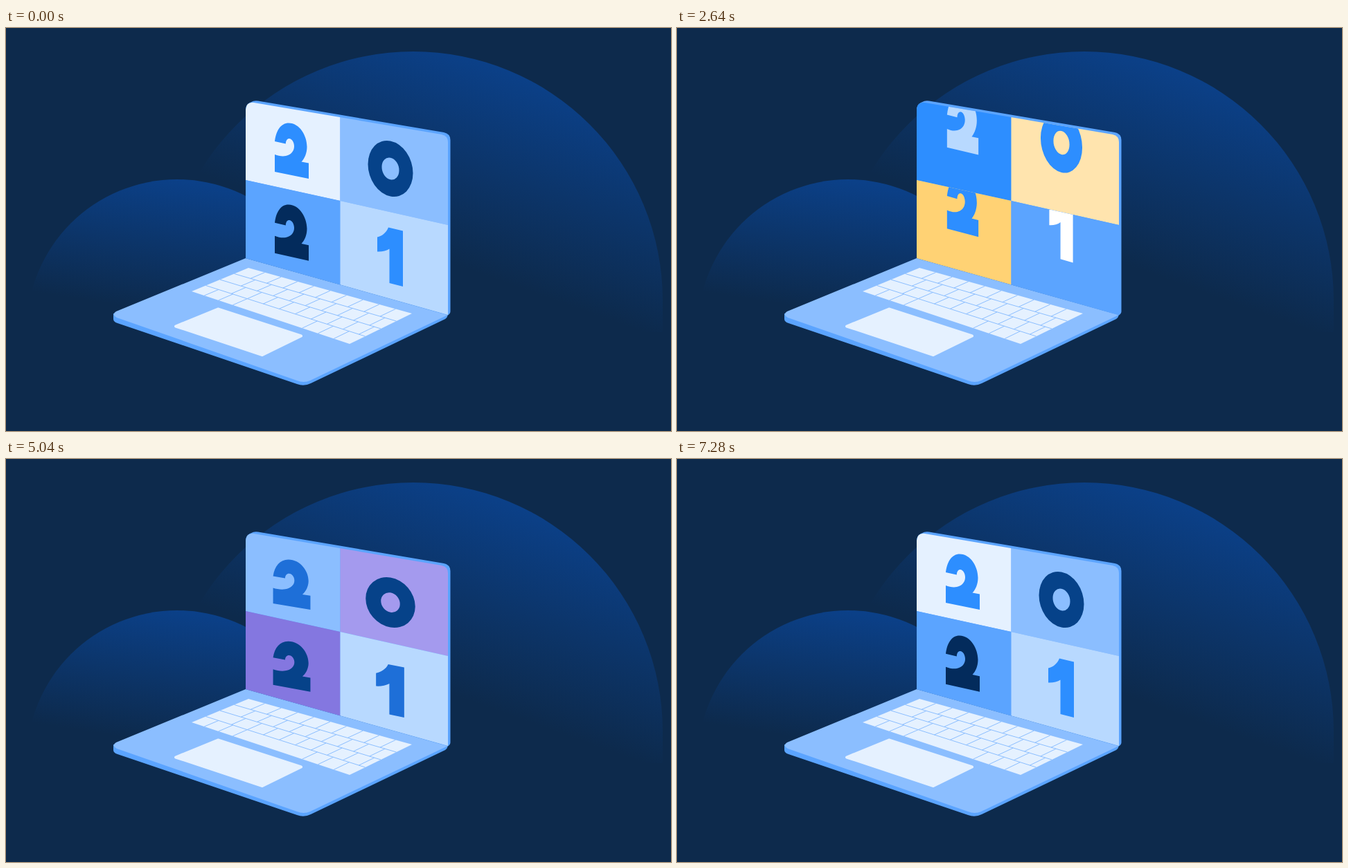
These frames come from a looping animation (960x583 px, 7560 ms). An HTML page:

```html
<!DOCTYPE html>
<html lang="en">
<head>
<meta charset="utf-8">
<title>2021 laptop</title>
<style>
  html, body { margin: 0; width: 100%; height: 100%; overflow: hidden; background: #0d2a4c; }
  svg { display: block; width: 100%; height: 100%; }
</style>
</head>
<body>
<svg viewBox="0 0 960 583" xmlns="http://www.w3.org/2000/svg">
  <defs>
    <linearGradient id="bigGlow" gradientUnits="userSpaceOnUse" x1="709" y1="56" x2="611" y2="329">
      <stop offset="0" stop-color="#0b4088"/>
      <stop offset="1" stop-color="#0d2a4c"/>
    </linearGradient>
    <linearGradient id="smallGlow" gradientUnits="userSpaceOnUse" x1="262" y1="222" x2="232" y2="412">
      <stop offset="0" stop-color="#0b4088"/>
      <stop offset="1" stop-color="#0d2a4c"/>
    </linearGradient>
    <clipPath id="screen"><path d="M346 333V118Q347 106.500 358 108L629 154Q638 156 638 165V415Z"/></clipPath>
  </defs>

  <path d="M228 394A360 360 0 0 1 948 394V440H228Z" fill="url(#bigGlow)"/>
  <path d="M30 436A217 217 0 0 1 464 436Z" fill="url(#smallGlow)"/>

  <path d="M155 413V421Q155 425 161 427L420 515Q430 519 440 514L634 421Q638 418 638 413Z" fill="#5ba4ff"/>
  <path d="M346 333L159 410Q152 414 160 419L420 510Q430 514 439 510L638 415Z" fill="#8bbeff"/>
  <path d="M346 333V118Q346 111 352 108L357 105.800Q360 104.800 364 105.500L632 151Q641.500 153 641.500 162V410Q641.500 413 638 415.500Z" fill="#5ba4ff"/>
  <g id="cells" clip-path="url(#screen)"></g>

  <path d="M350 347L268 381L496 457L586 413Z" fill="#e5f1ff"/>
  <path id="keys" fill="none" stroke="#8bbeff"/>
  <path d="M306 406.500L245 431.500L370 473L426 445.500Z" fill="#e5f1ff" stroke="#e5f1ff" stroke-width="4" stroke-linejoin="round"/>
</svg>

<script>
const SCENE = 1880, LOOP = 7560, STEP = 40, RECOLOR = 1200;

const two = 'M388 164C390 148 397 137.500 408 137.500C424 137.500 434.500 156 434.500 172' +
  'C434.500 181 431 189 426.500 193.500L437 195.500V218L388 208V183C393 185 399 186 404 185' +
  'C411 183.500 416 178.500 416 171C416 165 412.500 160 409 160C406 160 404 162.500 403.800 167.500Z';
const ring = (rx, ry) => `M${-rx} 0A${rx} ${ry} 0 0 1 ${rx} 0A${rx} ${ry} 0 0 1 ${-rx} 0Z`;
const zero = ring(32.5, 40) + ring(12.5, 15.8);
const one = 'M536 302.500C543 301 549 296 552 288.500L573 293.500V374L553.500 369V319.500C549 322.500 542 324 536 323.500Z';

// Each cell: outline, digit, its slant, and the foot it is scaled about.
const cells = [
  { area: 'M340 90L482.500 90V250L340 218.700Z', digit: two, slant: '', foot: [412.5, 218] },
  { area: 'M482.500 90H650V287.700L482.500 250Z', digit: zero, slant: 'matrix(1 .2 0 1 555 203.500)', foot: [555, 244] },
  { area: 'M340 218.700L482.500 250V380H340Z', digit: two, slant: 'matrix(1 .02 0 1 0 109.900)', foot: [412.5, 336.7] },
  { area: 'M482.500 250L650 287.700V430H482.500Z', digit: one, slant: '', foot: [554.5, 374] }
];

const palettes = [
  { cells: ['#e5f1ff', '#8bbeff', '#5ba4ff', '#b8d9ff'], digits: ['#2d8eff', '#064289', '#032b5c', '#2d8eff'] },
  { cells: ['#2d8eff', '#ffe4ae', '#ffd274', '#5ba4ff'], digits: ['#b8d9ff', '#2d8eff', '#2d8eff', '#ffffff'] },
  { cells: ['#135ab0', '#ffb9c0', '#ff9298', '#1e6fd8'], digits: ['#2d8eff', '#e5f1ff', '#e5f1ff', '#8bbeff'] },
  { cells: ['#8bbeff', '#a49aee', '#8477e0', '#b8d9ff'], digits: ['#1e6fd8', '#064289', '#064289', '#1e6fd8'] }
];

const widthStops = [[0, 1], [240, 1.2], [480, 0.8], [960, 1], [1280, 1.1], [1640, 1]];
const liftStops = [[0, 0], [240, 0], [960, -42.5], [1200, 0]];

function tween(stops, t) {
  const next = stops.findIndex(([time]) => time > t);
  if (next < 0) return stops[stops.length - 1][1];
  const [t0, v0] = stops[next - 1], [t1, v1] = stops[next];
  const x = (t - t0) / (t1 - t0);
  return v0 + (v1 - v0) * x * x * (3 - 2 * x);
}

function add(parent, tag, attrs) {
  const node = document.createElementNS('http://www.w3.org/2000/svg', tag);
  for (const name in attrs) node.setAttribute(name, attrs[name]);
  return parent.appendChild(node);
}

function buildCells() {
  const screen = document.getElementById('cells');
  const defs = document.querySelector('defs');
  cells.forEach((cell, i) => {
    add(add(defs, 'clipPath', { id: 'cell' + i }), 'path', { d: cell.area });
    cell.back = add(screen, 'path', { d: cell.area });
    const window = add(screen, 'g', { 'clip-path': `url(#cell${i})` });
    cell.mover = add(window, 'g', {});
    add(cell.mover, 'path', { d: cell.digit, transform: cell.slant, 'fill-rule': 'evenodd' });
  });
}

function buildKeys() {
  const mix = (a, b, k) => a + (b - a) * k;
  const point = (along, depth) =>
    mix(mix(350, 586, along), mix(268, 496, along), depth).toFixed(1) + ' ' +
    mix(mix(347, 413, along), mix(381, 457, along), depth).toFixed(1);
  const line = (a, b) => `M${a}L${b}`;
  const even = start => Array.from({ length: 9 }, (_, i) => start + i * 0.1);
  const rows = [even(0.1), even(0.13), even(0.16), [0.08, 0.17, 0.26, 0.7, 0.8, 0.9]];
  let d = '';
  rows.forEach((row, r) => {
    if (r) d += line(point(0, r / 4), point(1, r / 4));
    row.forEach(a => { d += line(point(a, r / 4), point(a, (r + 1) / 4)); });
  });
  document.getElementById('keys').setAttribute('d', d);
}

function render(time) {
  const t = Math.floor((time % LOOP) / STEP) * STEP;
  const scene = Math.min(3, Math.floor(t / SCENE));
  const local = t - scene * SCENE;
  const palette = palettes[(scene + (local >= RECOLOR ? 1 : 0)) % 4];
  const width = tween(widthStops, local);
  const lift = tween(liftStops, local);
  cells.forEach((cell, i) => {
    const [x, y] = cell.foot;
    cell.back.setAttribute('fill', palette.cells[i]);
    cell.mover.setAttribute('fill', palette.digits[i]);
    cell.mover.setAttribute('transform',
      `translate(${x} ${y + lift}) scale(${width} ${2 - width}) translate(${-x} ${-y})`);
  });
}

buildCells();
buildKeys();
const start = performance.now();
function loop() {
  render(performance.now() - start);
  requestAnimationFrame(loop);
}
loop();
</script>
</body>
</html>
```
